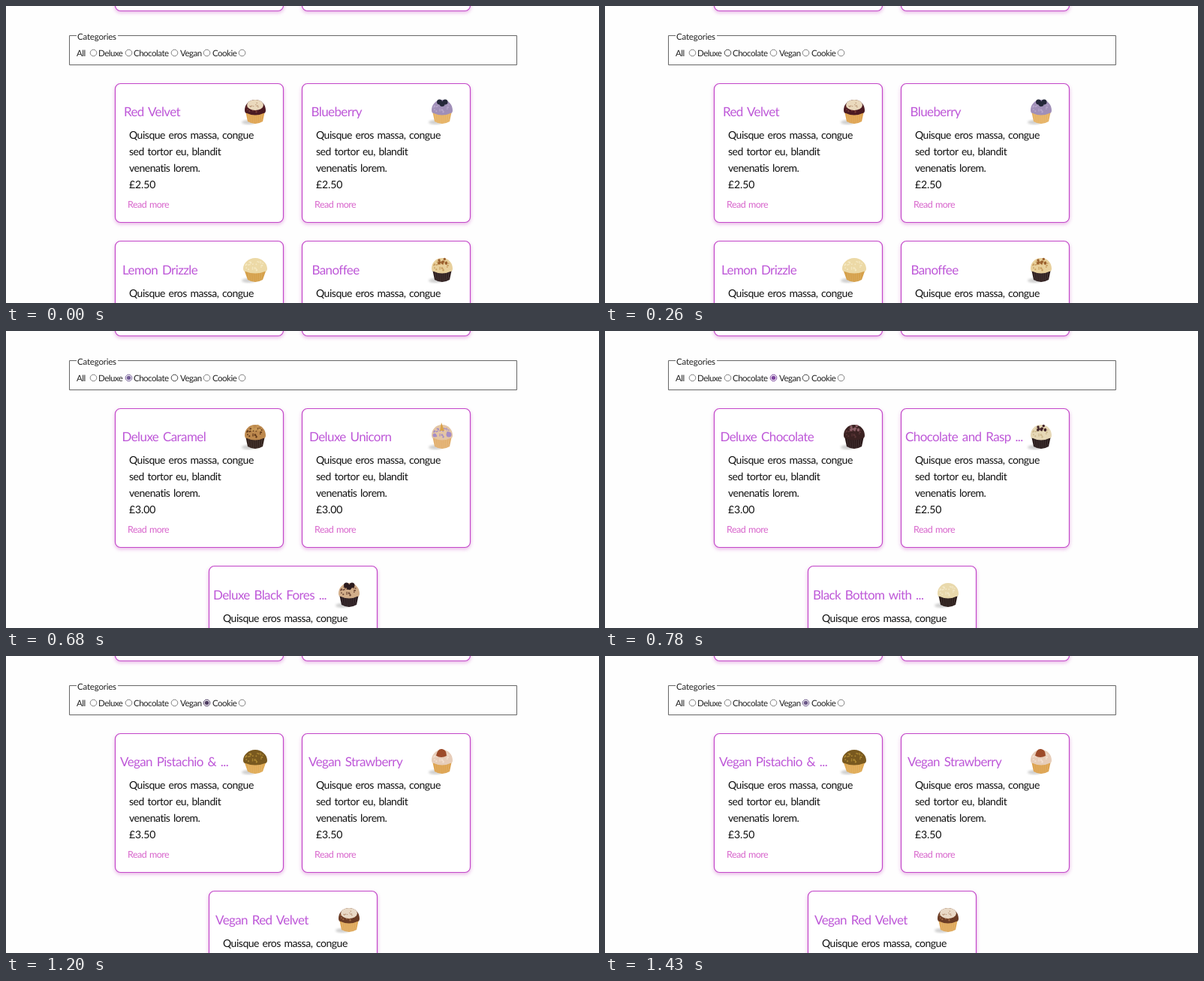
Animation, 790 px wide and 396 px high, one loop 1.56 s. Source, as an HTML page:

```html
<!DOCTYPE html>
<html lang="en">
<head>
<meta charset="utf-8">
<title>Cupcake menu</title>
<style>
html, body { margin: 0; width: 100%; height: 100%; overflow: hidden; background: #fefefe; }
svg { display: block; width: 790px; height: 396px; }
text { font: 14px Lato, "Open Sans", sans-serif; letter-spacing: -.48px; word-spacing: 1.5px; fill: #111; text-rendering: geometricPrecision; }
.title { font-size: 17px; letter-spacing: -.6px; word-spacing: 2px; fill: #be58d8; }
.price { letter-spacing: -.1px; }
.more { font-size: 12.5px; letter-spacing: -.5px; word-spacing: 1px; fill: #d866cc; }
.label { font-size: 11.5px; letter-spacing: -.5px; fill: #222; }
.legend { letter-spacing: -.2px; }
.card { fill: #fff; stroke: #c348c9; stroke-width: 1.2; filter: drop-shadow(0 2px 2.5px rgba(200, 70, 195, .4)); }
</style>
</head>
<body>
<svg id="stage" viewBox="0 0 790 396"></svg>
<script>
const LOOP = 1560;

// Cake: wrapper, frosting, sprinkle colour, decoration, optional decoration colour
const cakes = {
  redVelvet: ['#dfa452', '#4b1a22', '#7a3d35', 'cap', '#ead9bd'],
  blueberry: ['#e6b264', '#a08fb8', '#b8a8cc', 'berries', '#25283a'],
  lemon: ['#d5a04a', '#ecd9a6', '#f5e9c4', 'wide'],
  banoffee: ['#302020', '#e8d09c', '#c89d60', 'crumbs', '#9c6230'],
  caramel: ['#33221c', '#bd894e', '#5c3518', 'crumbs', '#c99a58'],
  unicorn: ['#e2b070', '#e4c5a4', '#a48cc6', 'horn', '#d9a24a'],
  forest: ['#2a1c20', '#d2ae8a', '#6b4636', 'berries', '#2b1b1e'],
  chocolate: ['#2b191a', '#3b2222', '#5c3638', 'crumbs', '#8d6068'],
  raspberry: ['#2a1c1c', '#e6d8b6', '#cdb98e', 'crumbs', '#43242a'],
  blackBottom: ['#2b1d1a', '#e9d9ac', '#f3e8c8', 'plain'],
  pistachio: ['#e0ab56', '#79591f', '#b08b35', 'wide'],
  strawberry: ['#dda350', '#e7cdb9', '#f4e2d3', 'fruit', '#9d4b2a'],
  veganVelvet: ['#dfa95c', '#6b3c25', '#a06b45', 'cap', '#e9d9c6']
};

// Item: card x, card y, title, title offset, price, cake
const scenes = [
  [
    [145, 103, 'Red Velvet', 12, '2.50', 'redVelvet'],
    [394, 103, 'Blueberry', 12.5, '2.50', 'blueberry'],
    [145, 313, 'Lemon Drizzle', 10, '2.50', 'lemon'],
    [394, 313, 'Banoffee', 13.5, '2.50', 'banoffee']
  ], [
    [145, 103, 'Deluxe Caramel', 9.5, '3.00', 'caramel'],
    [394, 103, 'Deluxe Unicorn', 10, '3.00', 'unicorn'],
    [270, 313, 'Deluxe Black Fores ...', 6, '3.00', 'forest']
  ], [
    [145, 103, 'Deluxe Chocolate', 8.5, '3.00', 'chocolate'],
    [394, 103, 'Chocolate and Rasp ...', 6, '2.50', 'raspberry'],
    [270, 313, 'Black Bottom with ...', 7, '2.50', 'blackBottom']
  ], [
    [145, 103, 'Vegan Pistachio &amp; ...', 7, '3.50', 'pistachio'],
    [394, 103, 'Vegan Strawberry', 9, '3.50', 'strawberry'],
    [270, 313, 'Vegan Red Velvet', 9, '3.50', 'veganVelvet']
  ]
];

// Step: start time, scene, chosen radio, its colour, hovered radio
const steps = [
  [0, 0, -1, '', -1],
  [260, 0, -1, '', 1],
  [520, 1, 1, '#745f98', 2],
  [780, 2, 2, '#7d469e', 3],
  [1040, 3, 3, '#4f3d62', -1],
  [1300, 3, 3, '#596589', -1],
  [1430, 3, 3, '#6c5889', -1]
];

// Radio: label, label x, circle x
const radios = [
  ['All', 94, 116.5], ['Deluxe', 123, 163.5], ['Chocolate', 170, 224.5],
  ['Vegan', 232, 267.5], ['Cookie', 275, 314.5]
];

const text = (cls, x, y, str) => `<text class="${cls}" x="${x}" y="${y}">${str}</text>`;
const dot = (x, y, r, fill) => `<circle cx="${x}" cy="${y}" r="${r}" fill="${fill}"/>`;
const path = (d, fill) => `<path d="${d}" fill="${fill}"/>`;
const box = (x, y) => `<rect class="card" x="${x + .5}" y="${y + .5}" width="224" height="185" rx="7"/>`;

function random(seed) {
  return () => (seed = seed * 16807 % 2147483647) / 2147483647;
}

function scatter(count, rx, ry, cy, r, fill, seed) {
  const rnd = random(seed);
  return Array.from({ length: count }, () => {
    const a = rnd() * 2 * Math.PI, d = Math.sqrt(rnd());
    return dot((Math.cos(a) * d * rx).toFixed(1), (cy + Math.sin(a) * d * ry).toFixed(1), r, fill);
  }).join('');
}

function cake([wrapper, frosting, sprinkle, kind, extra]) {
  const w = kind === 'wide' ? 16 : 14;
  let out = '<ellipse cx="-9" cy="14" rx="9" ry="3" fill="#888" opacity=".4" filter="url(#shade)"/>'
    + path(`M${1 - w}-1H${w - 1}L10 13Q0 19-10 13Z`, wrapper);
  for (let x = -9; x <= 9; x += 3)
    out += `<path d="M${x} 3L${x * .85} 15" stroke="#fff" stroke-width=".7" opacity=".16"/>`;
  out += path(`M${-w}-2C${-w}-9-9-16 0-16S${w}-9 ${w}-2Q${w} 2 ${w - 3} 2Q0 7 ${3 - w} 2Q${-w} 2 ${-w}-2Z`, frosting)
    + scatter(32, w - 2, 7, -6, .9, sprinkle, 71);
  if (kind === 'cap') out += `<ellipse cy="-9" rx="11" ry="7" fill="${extra}"/>` + scatter(10, 8, 4, -8, .7, '#b58f70', 9);
  if (kind === 'berries') out += dot(-3.5, -13, 3.5, extra) + dot(4, -13, 3.5, extra) + dot(0, -10.5, 3.5, extra);
  if (kind === 'crumbs') out += scatter(9, 8, 4, -11, 1.7, extra, 23);
  if (kind === 'horn') out += path('M-3-8L-1-19L3-8Z', extra) + dot(9, -3, 3.5, sprinkle) + dot(-10, -2, 2.5, sprinkle);
  if (kind === 'fruit') out += path('M-8-8Q-6-18 0-17Q6-16 6-8Q-1-4-8-8Z', extra);
  return out;
}

function item([x, y, title, offset, price, name]) {
  const lines = ['Quisque eros massa, congue', 'sed tortor eu, blandit', 'venenatis lorem.'];
  return box(x, y) + `<g transform="translate(${x} ${y > 300 ? y + 1 : y})">`
    + text('title', offset, 44, title)
    + lines.map((line, i) => text('', 19, 73.5 + 22 * i, line)).join('')
    + text('price', 19, 139.5, '£' + price)
    + text('more', 17, 165.5, 'Read more')
    + `<g transform="translate(187 38)" filter="url(#soft)">${cake(cakes[name])}</g></g>`;
}

const blur = (id, size) => `<filter id="${id}"><feGaussianBlur stdDeviation="${size}"/></filter>`;
const stage = document.getElementById('stage');
stage.innerHTML = blur('shade', 1.5) + blur('soft', .4)
  + box(145, -179) + box(394, -179)
  + '<path d="M94 39.5H84.5V78.5H680.5V39.5H149" fill="none" stroke="#666"/>'
  + text('label legend', 95, 45, 'Categories')
  + radios.map(([label, x, cx]) => text('label', x, 67, label)
    + `<g class="radio"><circle cx="${cx}" cy="62.5" r="4.3" fill="#fff"/><circle cx="${cx}" cy="62.5" r="2.8"/></g>`).join('')
  + scenes.map(list => `<g class="scene">${list.map(item).join('')}</g>`).join('');

const sceneNodes = stage.querySelectorAll('.scene');
const radioNodes = stage.querySelectorAll('.radio');

function show([, scene, chosen, color, hovered]) {
  sceneNodes.forEach((node, i) => node.setAttribute('display', i === scene ? 'inline' : 'none'));
  radioNodes.forEach(({ children: [ring, mark] }, i) => {
    ring.setAttribute('stroke', i === chosen ? color : i === hovered ? '#444' : '#808080');
    mark.setAttribute('fill', i === chosen ? color : 'none');
  });
}

const start = performance.now();
function frame() {
  const t = (performance.now() - start) % LOOP;
  show(steps.findLast(step => step[0] <= t));
  requestAnimationFrame(frame);
}
frame();
</script>
</body>
</html>
```
